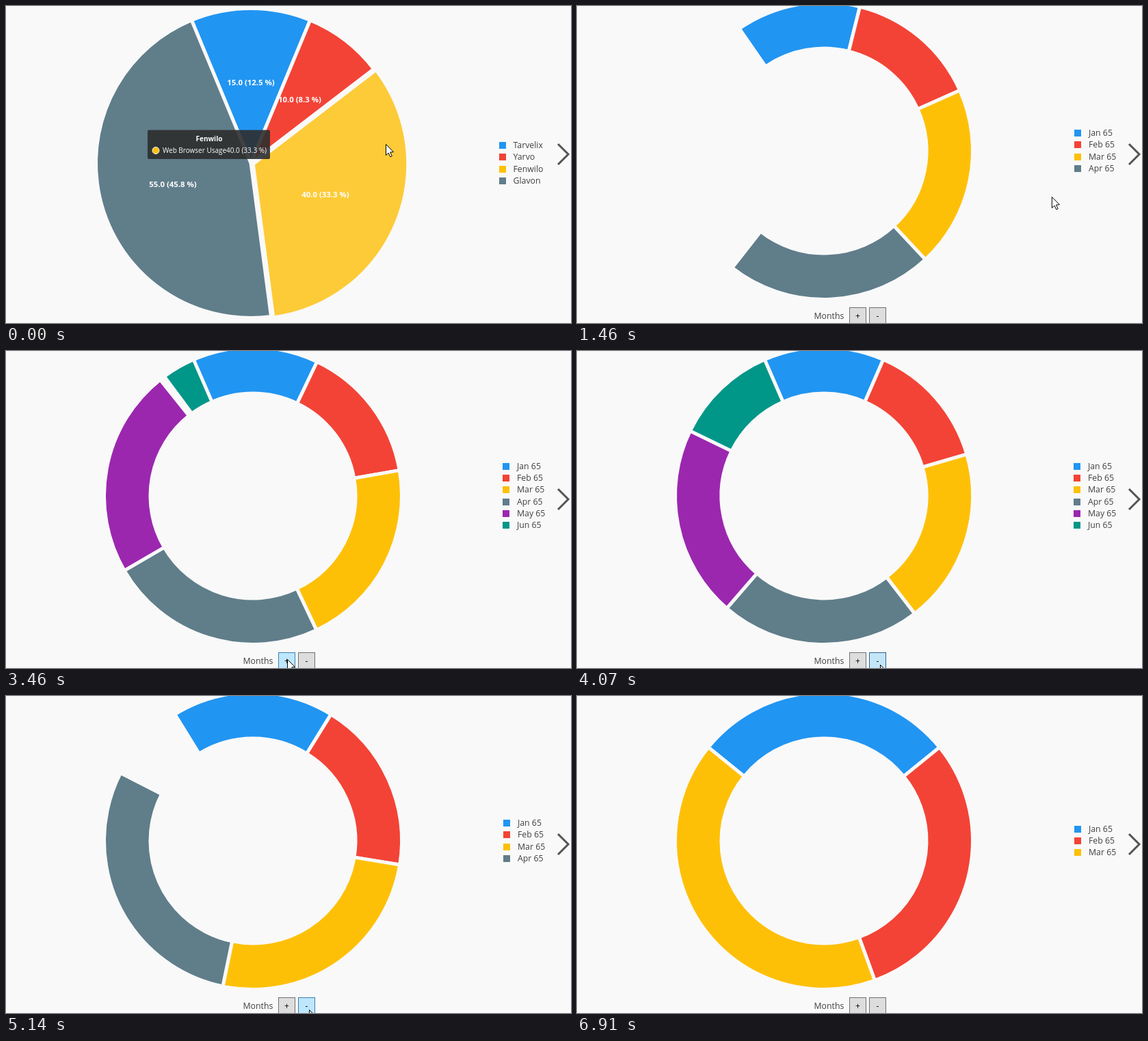
Write an HTML page with a canvas that moves like this. It is 826 by 464 pixels and loops after 7350 ms.

```html
<!DOCTYPE html>
<html lang="en">
<head>
<meta charset="utf-8">
<title>Pie and doughnut charts</title>
<style>
  html, body { margin: 0; width: 100%; height: 100%; overflow: hidden; background: #f9f9f9; }
  canvas { display: block; }
</style>
</head>
<body>
<canvas id="stage" width="826" height="464"></canvas>
<script>
const ctx = document.getElementById('stage').getContext('2d');
const LOOP = 7350, SWAP = 1050, GROW = 500;
const BG = '#f9f9f9', INK = '#404040';
const COLORS = ['#2195f2', '#f34336', '#fec007', '#607d8a', '#9b27af', '#009688'];
const FONT = '"Open Sans", "Noto Sans", sans-serif';

const BROWSERS = ['Tarvelix', 'Yarvo', 'Fenwilo', 'Glavon'];
const USAGE = [15, 10, 40, 55];
const USAGE_LABELS = [
  ['15.0 (12.5 %)', 358, 116], ['10.0 (8.3 %)', 429.5, 141],
  ['40.0 (33.3 %)', 467, 280], ['55.0 (45.8 %)', 244, 265]
];

const MONTHS = ['Jan 65', 'Feb 65', 'Mar 65', 'Apr 65', 'May 65', 'Jun 65'];
const VALUES = [102, 109, 149, 170, 163, 88];
const BORN = [1110, 1110, 1110, 1110, 2640, 3300];
const COUNTS = [[0, 4], [2610, 5], [3310, 6], [4360, 5], [4820, 4], [5720, 3]];
const PRESSES = [[2490, 2610], [3170, 3310], [4070, 4360], [4640, 4820], [5480, 5710]];

const sum = list => list.reduce((a, b) => a + b, 0);
const scaleFor = n => 360 / sum(VALUES.slice(0, n));
const clamp = v => Math.max(0, Math.min(1, v));

// degrees per unit of value over time
const SCALE = [
  [2640, scaleFor(4)], [3140, scaleFor(5)], [3300, scaleFor(5)], [3800, scaleFor(6)],
  [4360, scaleFor(6)], [4820, scaleFor(6) * .08 + scaleFor(5) * .92],
  [5320, scaleFor(4)], [5720, scaleFor(4)], [6220, scaleFor(3)]
];
const CURSOR = [
  [400, 555, 202], [850, 811, 209], [1300, 811, 209], [1810, 440, 431], [2000, 411, 451],
  [3850, 411, 451], [3950, 443, 459], [6570, 443, 459], [6910, 716, 468]
];

function track(keys, t, col = 1) {
  const i = keys.findIndex(k => k[0] > t);
  if (i === 0) return keys[0][col];
  if (i < 0) return keys[keys.length - 1][col];
  const a = keys[i - 1], b = keys[i];
  return a[col] + (b[col] - a[col]) * (t - a[0]) / (b[0] - a[0]);
}

function text(str, x, y, size, color = INK, align = 'left', weight = 400) {
  ctx.font = `${weight} ${size}px ${FONT}`;
  ctx.fillStyle = color;
  ctx.textAlign = align;
  ctx.fillText(str, x, y);
}

function polyline(points) {
  ctx.beginPath();
  points.forEach(([x, y]) => ctx.lineTo(x, y));
}

// angles in degrees, clockwise from the top
function slice(cx, cy, inner, outer, from, to, color, alpha = 1) {
  if (to - from < .01) return;
  const a = (from - 90) * Math.PI / 180, b = (to - 90) * Math.PI / 180;
  ctx.beginPath();
  ctx.arc(cx, cy, outer, a, b);
  if (inner) ctx.arc(cx, cy, inner, b, a, true);
  else ctx.lineTo(cx, cy);
  ctx.closePath();
  ctx.globalAlpha = alpha;
  ctx.fillStyle = color;
  ctx.fill();
  ctx.globalAlpha = 1;
  ctx.strokeStyle = BG;
  ctx.lineWidth = 5;
  ctx.stroke();
}

function legend(names, boxX, textX, centerY) {
  names.forEach((name, i) => {
    const y = centerY + (i - (names.length - 1) / 2) * 17.1;
    ctx.fillStyle = COLORS[i];
    ctx.fillRect(boxX, Math.round(y - 5), 10, 10);
    text(name, textX, Math.round(y + 4), 12.3);
  });
}

function tooltip(x, y) {
  ctx.fillStyle = 'rgba(46,46,46,.9)';
  ctx.beginPath();
  ctx.roundRect(x, y, 179, 42.5, 2);
  ctx.fill();
  text(BROWSERS[2], x + 90, y + 16.5, 10, '#fff', 'center', 700);
  ctx.beginPath();
  ctx.arc(x + 12, y + 30, 5, 0, 7);
  ctx.fillStyle = COLORS[2];
  ctx.fill();
  ctx.strokeStyle = '#fff';
  ctx.lineWidth = 1;
  ctx.stroke();
  text('Web Browser Usage', x + 22, y + 33.5, 10, '#fff');
  text('40.0 (33.3 %)', x + 115, y + 33.5, 10, '#fff');
}

function pie(t, hovered) {
  const push = track([[0, 3.5], [120, 5], [450, 5], [650, 0]], t);
  let from = -22.5;
  USAGE.forEach((value, i) => {
    const to = from + value * 3, mid = (from + to) / 2 * Math.PI / 180;
    const out = i === 2 ? push : 0;
    slice(358 + out * Math.sin(mid), 230 - out * Math.cos(mid), 0, 226.5,
      from, to, COLORS[i], i === 2 && hovered ? .8 : 1);
    from = to;
  });
  USAGE_LABELS.forEach(([str, x, y]) => text(str, x, y, 11.4, '#fff', 'center', 700));
  legend(BROWSERS, 721, 741.5, 230);
  tooltip(track([[0, 207], [120, 204]], t), 181.5);
}

function doughnut(t, count) {
  const scale = track(SCALE, t), start = -VALUES[0] / 2 * scale;
  let total = 0;
  VALUES.slice(0, count).forEach((value, i) => {
    const p = clamp((t - BORN[i]) / GROW);
    let from = start + total * scale * p, to = from + value * scale * p;
    if (i > 3 && p < 1) {
      // a late slice opens backwards from its final end
      const k = scaleFor(i + 1);
      to = 360 - VALUES[0] / 2 * k;
      from = to - value * k * p;
    }
    slice(361, 212, 150, 217.5, from, to, COLORS[i]);
    total += value;
  });
}

function button(label, x, t, cx, cy) {
  const hover = cx >= x && cx < x + 25 && cy >= 441 && cy < 466;
  const pressed = hover && PRESSES.some(([a, b]) => t >= a && t < b);
  ctx.fillStyle = pressed ? '#c4e5f6' : hover ? '#bee6fd' : '#dddddd';
  ctx.fillRect(x, 441, 25, 26);
  ctx.strokeStyle = pressed ? '#2c628b' : hover ? '#3c7fb1' : '#707070';
  ctx.lineWidth = 1;
  ctx.strokeRect(x + .5, 441.5, 24, 26);
  text(label, x + 12.5, 458, 12, '#000', 'center');
}

function chevron() {
  polyline([[807, 202], [822, 217], [807, 232]]);
  ctx.strokeStyle = '#555';
  ctx.lineWidth = 3;
  ctx.stroke();
}

function pointer(x, y) {
  ctx.save();
  ctx.translate(x + .5, y + .5);
  polyline([[0, 0], [0, 16], [3.7, 12.6], [6.4, 18.3], [8.8, 17.2], [6.2, 11.5], [11, 11.2]]);
  ctx.closePath();
  ctx.fillStyle = '#fff';
  ctx.fill();
  ctx.strokeStyle = '#000';
  ctx.lineWidth = 1;
  ctx.stroke();
  ctx.restore();
}

function draw(t) {
  const x = track(CURSOR, t), y = track(CURSOR, t, 2);
  ctx.fillStyle = BG;
  ctx.fillRect(0, 0, 826, 464);
  if (t < SWAP) {
    pie(t, x < 584);
  } else {
    const count = COUNTS.filter(c => c[0] <= t).pop()[1];
    doughnut(t, count);
    const shift = count > 4 ? 1 : 0;
    legend(MONTHS.slice(0, count), 727 - shift, 748 - shift, 212);
    text('Months', 346.5, 458, 12.3);
    button('+', 398, t, x, y);
    button('-', 427, t, x, y);
  }
  chevron();
  if (t < 6910) pointer(x, y);
}

const began = performance.now();
function tick() {
  draw((performance.now() - began) % LOOP);
  requestAnimationFrame(tick);
}
tick();
</script>
</body>
</html>
```
